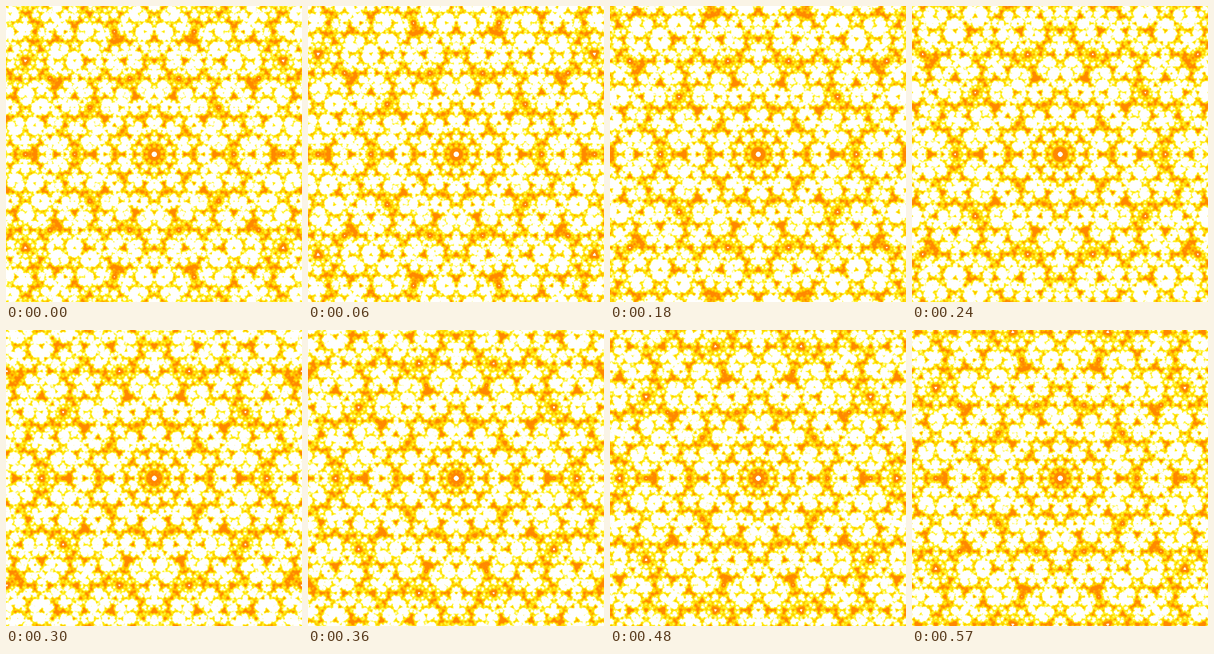
An HTML page with a canvas for the animation above (0.6 s loop, 500 by 500 pixels).

```html
<!DOCTYPE html>
<html lang="en">
<head>
<meta charset="utf-8">
<title>Endless quasicrystal zoom</title>
<style>
html, body { margin: 0; width: 100%; height: 100%; overflow: hidden; background: #fff; }
canvas { display: block; }
</style>
</head>
<body>
<canvas id="stage" width="500" height="500"></canvas>
<script>
const SIZE = 500, MID = 250, LOOP = 600, STEP = 30;
const BASE = 15.95;   // wavelength in px of octave 0 at the start of the loop
const FINE = 8;       // profile samples per px
const WHITE = 0xffffffff;
const ctx = document.getElementById('stage').getContext('2d');
const image = ctx.createImageData(SIZE, SIZE);
const pixels = new Uint32Array(image.data.buffer);
const profile = new Float32Array(360 * FINE);

// Five wave directions, 36 degrees apart
const waves = [18, 54, 90, 126, 162].map(deg => {
  const a = deg * Math.PI / 180;
  return [Math.cos(a) * FINE, Math.sin(a) * FINE];
});

// Wave height -> colour; white below the first and above the last stop
const stops = [
  [-0.9, 255, 255, 255],
  [0.4, 255, 246, 60],
  [1.8, 255, 222, 0],
  [4.9, 255, 136, 0],
  [10.6, 255, 136, 0],
  [11.2, 255, 255, 255]
];
const LOW = stops[0][0], HIGH = stops[stops.length - 1][0];

function colour(v) {
  const i = stops.findIndex(s => s[0] > v);
  if (i < 1) return WHITE;
  const a = stops[i - 1], b = stops[i];
  const k = (v - a[0]) / (b[0] - a[0]);
  const mix = c => Math.round(a[c] + (b[c] - a[c]) * k);
  return (255 << 24 | mix(3) << 16 | mix(2) << 8 | mix(1)) >>> 0;
}

const palette = Uint32Array.from(
  { length: Math.ceil((HIGH - LOW) * 100) + 1 },
  (_, i) => colour(LOW + i / 100)
);

// One wave train: octaves that fade in when fine and fade out when coarse
function buildProfile(phase) {
  profile.fill(0);
  for (let n = -4; n <= 5; n++) {
    const octave = n + phase;
    const weight = Math.exp(-((octave - 0.7) ** 2) / 5);
    const k = 2 * Math.PI / (BASE * 2 ** octave * FINE);
    for (let i = 0; i < profile.length; i++) profile[i] += weight * Math.cos(k * i);
  }
}

function draw(phase) {
  buildProfile(phase);
  for (let y = 0, p = 0; y < SIZE; y++) {
    for (let x = 0; x < SIZE; x++, p++) {
      let v = 0;
      for (const [cx, cy] of waves) {
        v += profile[Math.abs((x - MID) * cx + (y - MID) * cy) + 0.5 | 0];
      }
      pixels[p] = v <= LOW || v >= HIGH ? WHITE : palette[(v - LOW) * 100 | 0];
    }
  }
  ctx.putImageData(image, 0, 0);
}

const start = performance.now();
let shown = -1;

function tick() {
  const step = Math.floor((performance.now() - start) % LOOP / STEP);
  if (step !== shown) {
    shown = step;
    draw(step * STEP / LOOP);
  }
  requestAnimationFrame(tick);
}
tick();
</script>
</body>
</html>
```
